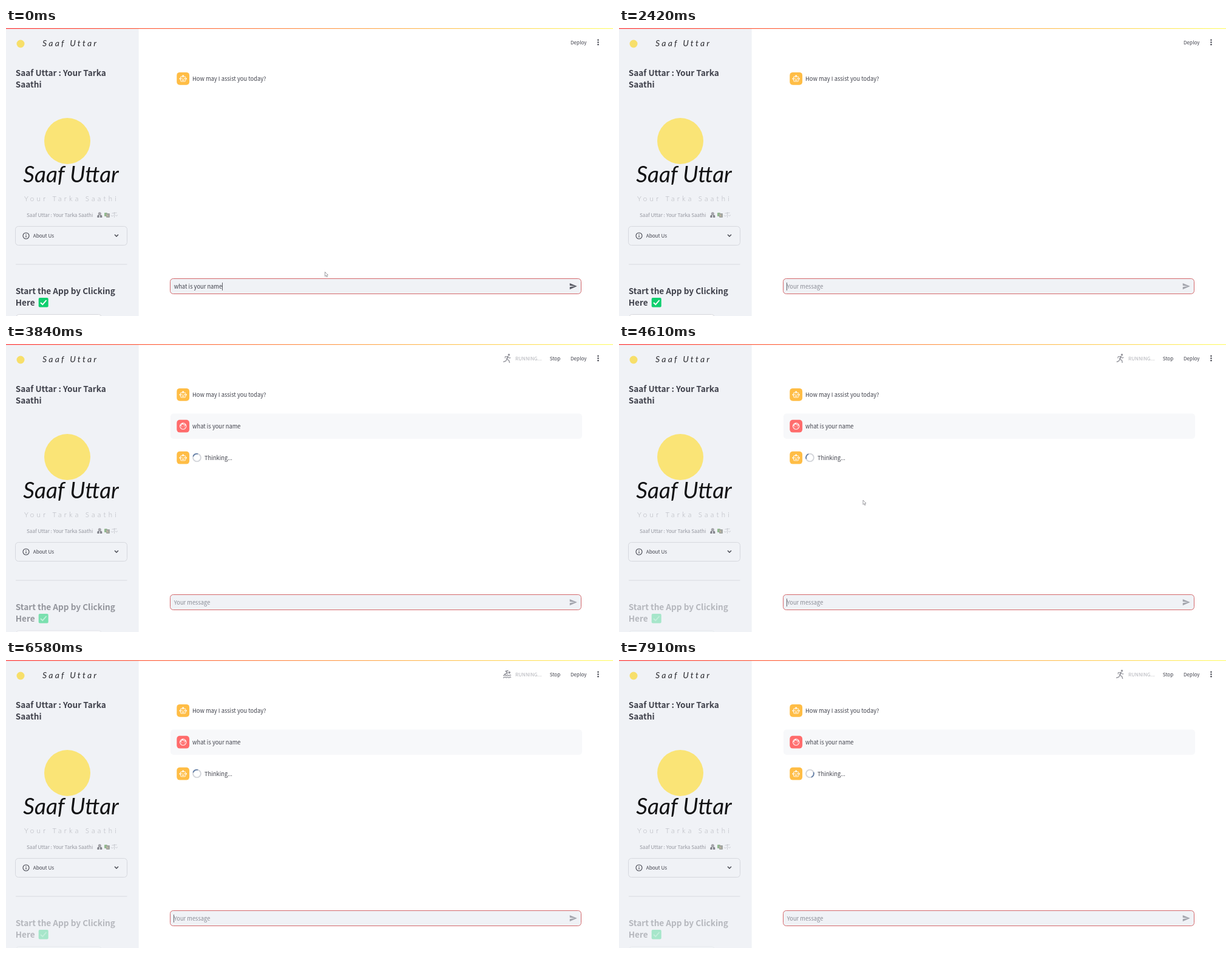
Recreate the animation shown at these times as an HTML page with a canvas. Size 1000x474 px, loop 8000 ms.

```html
<!DOCTYPE html>
<html lang="en">
<head>
<meta charset="utf-8">
<title>Chat assistant</title>
<style>
  html, body { margin: 0; width: 100%; height: 100%; overflow: hidden; background: #fff; }
  canvas { display: block; width: 1000px; height: 474px; }
</style>
</head>
<body>
<canvas id="stage" width="1000" height="474"></canvas>
<script>
const ctx = document.getElementById('stage').getContext('2d');
const LOOP = 8000;
const SANS = '"Noto Sans CJK JP", "Noto Sans CJK SC", "Noto Sans CJK", "Open Sans", sans-serif';
const SCRIPT = 'Lato, sans-serif';
const INK = '#40424c', GREY = '#f0f2f6';
const BODY = 9.33, SMALL = 8.15, HEAD = 13.6;
const TIME = { hidePointer: 2130, send: 2420, message: 2500, running: 2500, thinking: 2620, fade: 3000, fadeEnd: 4000 };
const SEND_ICON = new Path2D('M2 21L23 12L2 3V10L17 12L2 14Z');

function text(str, x, y, size, color = INK, opts = {}) {
  ctx.font = `${opts.style || 'normal'} ${opts.weight || 400} ${size}px ${opts.family || SANS}`;
  ctx.letterSpacing = (opts.spacing || 0) + 'px';
  ctx.textAlign = opts.align || 'left';
  ctx.fillStyle = color;
  ctx.fillText(str, x, y);
}

function heading(str, y) {
  text(str, 15.7, y, HEAD, INK, { weight: 600 });
}

function box(x, y, w, h, r, fill, stroke) {
  ctx.beginPath();
  ctx.roundRect(x, y, w, h, r);
  if (fill) { ctx.fillStyle = fill; ctx.fill(); }
  if (stroke) { ctx.strokeStyle = stroke; ctx.lineWidth = 1; ctx.stroke(); }
}

function dot(x, y, r, color) {
  ctx.beginPath();
  ctx.arc(x, y, r, 0, Math.PI * 2);
  ctx.fillStyle = color;
  ctx.fill();
}

function ring(x, y, r, width, color, from = 0, to = Math.PI * 2) {
  ctx.beginPath();
  ctx.arc(x, y, r, from, to);
  ctx.strokeStyle = color;
  ctx.lineWidth = width;
  ctx.stroke();
}

function line(color, width, ...pts) {
  ctx.beginPath();
  for (let i = 0; i < pts.length; i += 2) ctx.lineTo(pts[i], pts[i + 1]);
  ctx.strokeStyle = color;
  ctx.lineWidth = width;
  ctx.stroke();
}

function botAvatar(cy) {
  box(281.3, cy - 10.4, 20.8, 20.8, 5, '#ffbd45');
  ctx.save();
  ctx.translate(291.7, cy);
  dot(0, -4.3, 1.4, '#fff');
  box(-4.2, -3.4, 8.4, 8, 1.3, null, '#fff');
  dot(-5.2, 0.2, 1.1, '#fff');
  dot(5.2, 0.2, 1.1, '#fff');
  dot(-1.9, -0.4, 0.9, '#fff');
  dot(1.9, -0.4, 0.9, '#fff');
  line('#fff', 1.1, -2.3, 2.3, 2.3, 2.3);
  ctx.restore();
}

function userAvatar(cy) {
  box(281.3, cy - 10.4, 20.8, 20.8, 5, '#ff6c6c');
  ctx.save();
  ctx.translate(291.7, cy);
  ring(0, 0, 5.1, 1.1, '#fff');
  ctx.beginPath();
  ctx.moveTo(-4.9, -0.6);
  ctx.quadraticCurveTo(-2, -1.5, -1.2, -4.4);
  ctx.quadraticCurveTo(1, -1.2, 4.8, -1.6);
  ctx.stroke();
  dot(-1.9, 1, 0.75, '#fff');
  dot(1.9, 1, 0.75, '#fff');
  ctx.restore();
}

function brand() {
  dot(24, 26, 6.5, '#f7df6a');
  text('Saaf Uttar', 60, 30, 14, '#2b2b30', { family: SCRIPT, style: 'italic', spacing: 3.2 });
  dot(101, 186, 38, '#fae476');
  text('Saaf Uttar', 107, 254, 37, '#121214', { family: SCRIPT, style: 'italic', align: 'center' });
  text('Your Tarka Saathi', 30, 284.5, 11.5, '#b2b4bb', { family: SCRIPT, weight: 300, spacing: 4.2 });
}

function captionIcons() {
  // judge
  ctx.beginPath();
  ctx.ellipse(154.3, 310, 4, 2.8, 0, Math.PI, 0);
  ctx.fillStyle = '#7d7e87';
  ctx.fill();
  dot(154.3, 305.5, 2.5, '#a5a5ab');
  box(150.3, 309.5, 8, 2.5, 0.5, '#85868e');
  line('#eceef2', 1.4, 154.3, 308, 154.3, 312);
  // books
  box(162, 304, 5, 6, 1, '#92b88f');
  box(165, 305, 6, 7, 1, '#a3a6a2');
  line('#dfc99a', 1, 166, 307, 168, 310);
  // scales
  line('#c6c8ce', 0.9, 178.5, 303, 178.5, 312);
  line('#c6c8ce', 0.9, 174.5, 305, 182.5, 304);
  ring(175, 308, 1.7, 0.8, '#c6c8ce', 0, Math.PI);
  ring(182, 307.5, 1.7, 0.8, '#c6c8ce', 0, Math.PI);
}

function startSection(alpha) {
  ctx.globalAlpha = alpha;
  heading('Start the App by Clicking', 438);
  heading('Here', 457);
  box(53.7, 444, 16, 15.6, 2, '#0fcf6f');
  line('#fff', 1.9, 57, 452, 60.3, 455.2, 66.5, 448);
  box(16.5, 471.5, 141, 24, 5, alpha > 0.5 ? '#fff' : GREY, '#d5d6dc');
  ctx.globalAlpha = 1;
}

function sidebar(t) {
  ctx.fillStyle = GREY;
  ctx.fillRect(0, 0, 218.7, 474);
  brand();
  heading('Saaf Uttar : Your Tarka', 79);
  heading('Saathi', 98);
  text('Saaf Uttar : Your Tarka Saathi', 34, 311, SMALL, '#93959e');
  captionIcons();
  box(15.5, 326.5, 184, 31, 5, null, '#d6d8de');
  ring(33, 342, 5, 1.1, INK);
  line(INK, 1.1, 33, 341.2, 33, 344.8);
  dot(33, 339.5, 0.7, INK);
  text('About Us', 44.7, 345.3, SMALL);
  line(INK, 1.4, 179, 340, 182, 343, 185, 340);
  line('#d9dbe0', 1, 16, 389, 199.5, 389);
  const p = Math.min(1, Math.max(0, (t - TIME.fade) / (TIME.fadeEnd - TIME.fade)));
  startSection(1 - 0.67 * p * p);
}

function runner(step) {
  const c = '#96979e', s = Math.sin(step * 1.3) * 0.8;
  dot(828.5, 17.8, 1.7, c);
  line(c, 2.2, 827, 20, 825, 25);
  line(c, 1.2, 826.5, 20.5, 822.5, 20.5, 821.5 + s, 23.5);
  line(c, 1.2, 827, 20.5, 829, 23, 831.5, 22 + s);
  line(c, 1.4, 825, 25, 828.5, 27, 829 + s, 31);
  line(c, 1.4, 825, 25, 823.5, 28, 820 - s, 29.5);
}

function swimmer(step) {
  const c = '#96979e', s = Math.sin(step * 1.3) * 0.6;
  dot(829.3, 20.5 + s * 0.4, 1.8, c);
  line(c, 1.8, 820.5, 24, 826, 21.5, 823.5, 18.5, 827.5, 17 + s);
  for (const y of [25.2, 28.6]) {
    ctx.beginPath();
    for (let x = 819; x <= 832; x++) ctx.lineTo(x, y + Math.sin((x - 819) * 1.45 + s) * 0.7);
    ctx.strokeStyle = c;
    ctx.lineWidth = 1.3;
    ctx.stroke();
  }
}

function header(t, step) {
  const bar = ctx.createLinearGradient(0, 0, 1000, 0);
  bar.addColorStop(0, '#ff4b4b');
  bar.addColorStop(1, '#fffd80');
  ctx.fillStyle = bar;
  ctx.fillRect(0, 0, 1000, 1.4);
  text('Deploy', 930, 26.7, SMALL);
  for (const y of [19.7, 23.5, 27.3]) dot(975.5, y, 1.2, INK);
  if (t < TIME.running) return;
  const m = t % 3300;
  (m >= 300 && m < 1800 ? runner : swimmer)(step);
  text('RUNNING...', 839, 26.7, SMALL, '#b1b2b8');
  text('Stop', 895.8, 26.7, SMALL);
}

function chat(t, step) {
  botAvatar(83.3);
  text('How may I assist you today?', 307, 87, BODY);
  if (t >= TIME.message) {
    box(271, 114.5, 678, 41.5, 5, '#f7f8fa');
    userAvatar(135.2);
    text('what is your name', 307, 139, BODY);
  }
  if (t >= TIME.thinking) {
    botAvatar(187.2);
    const a = (125 + (step + 9.7) * 36) * Math.PI / 180 - Math.PI / 2;
    ring(314.5, 187, 6.4, 1.9, '#d3d5da');
    ring(314.5, 187, 6.4, 1.9, '#6681a8', a - 0.78, a + 0.78);
    text('Thinking...', 327, 191, BODY);
  }
}

function caretOn(t) {
  if (t >= TIME.send) return (t + 100) % 1060 < 530;
  return t < 200 || (t >= 790 && t < 1310) || t >= 1800;
}

function inputBar(t) {
  const typed = t < TIME.send;
  box(270.5, 412.5, 677, 25, 5, GREY, '#d4686b');
  if (typed) text('what is your name', 276.7, 429, BODY);
  else text('Your message', 276.7, 429, BODY, '#8b8d96');
  if (caretOn(t)) {
    ctx.fillStyle = INK;
    ctx.fillRect(typed ? 356 : 276, 419, 0.8, 13);
  }
  ctx.save();
  ctx.translate(927.6, 418.2);
  ctx.scale(0.575, 0.575);
  ctx.fillStyle = typed ? '#5b5d67' : '#a3a5ad';
  ctx.fill(SEND_ICON);
  ctx.restore();
}

function pointer(x, y) {
  ctx.beginPath();
  for (const [dx, dy] of [[0, 0], [0, 7.2], [1.7, 5.8], [2.9, 8.4], [4, 7.9], [2.9, 5.3], [5, 5.1]]) ctx.lineTo(x + dx, y + dy);
  ctx.closePath();
  ctx.fillStyle = '#fff';
  ctx.fill();
  ctx.strokeStyle = '#77787e';
  ctx.lineWidth = 0.7;
  ctx.stroke();
}

function draw(t) {
  const step = Math.floor((t - 4130) / 94);
  ctx.fillStyle = '#fff';
  ctx.fillRect(0, 0, 1000, 474);
  sidebar(t);
  header(t, step);
  chat(t, step);
  inputBar(t);
  if (t < TIME.hidePointer) pointer(525.5, 401.5);
  else if (t >= 4500 && t < 4800) pointer(402, 257);
}

const start = performance.now();
function tick() {
  draw((performance.now() - start) % LOOP);
  requestAnimationFrame(tick);
}
tick();
</script>
</body>
</html>
```
